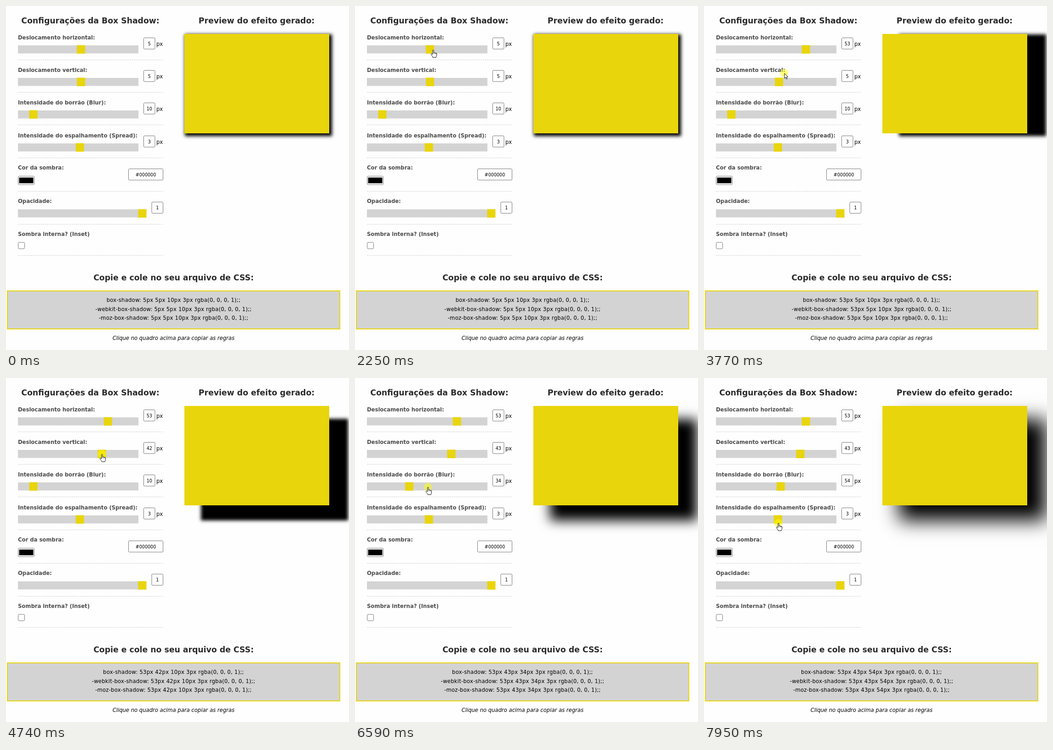
An HTML page that plays this animation: 746x751 px, repeating every 8 s.

```html
<!DOCTYPE html>
<html lang="pt">
<head>
<meta charset="utf-8">
<style>
  html, body { margin: 0; width: 746px; height: 751px; overflow: hidden; background: #fefefe; }
  body { position: relative; }
  svg { position: absolute; left: 0; top: 0; font: 11.6px "DejaVu Sans", sans-serif; }
  #preview { position: absolute; left: 388px; top: 61px; width: 315px; height: 217px; background: #e9d50b; }
  .title { font-size: 17.3px; font-weight: bold; fill: #2b2b2b; }
  .label { font-weight: bold; fill: #4b4b4b; }
  .small { font-size: 9.6px; }
  .mid { text-anchor: middle; }
  .code { letter-spacing: .24px; }
  .field { fill: #fff; stroke: #767676; }
  .track { fill: #d3d3d3; }
  .thumb { fill: #e9d50b; }
  .rule { stroke: #d0d0d0; stroke-dasharray: 3 1.5; }
  .output { fill: #d3d3d3; stroke: #e9d50b; stroke-width: 2; }
  .cursor { fill: #fff; stroke: #111; stroke-linejoin: round; }
</style>
</head>
<body>
<svg width="746" height="751"><g id="page"></g>
  <g id="pointer">
    <circle id="halo" r="9" fill="#ff0" fill-opacity=".5"/>
    <path id="arrow" class="cursor" d="M.5 .5V11.5L3 9.2 4.6 13 6.4 12.3 4.8 8.5H8.2Z"/>
    <g id="hand" class="cursor" transform="translate(.5 .3)">
      <path d="M-1.2 1Q0 -.6 1.2 1V6Q2.6 4.9 3.6 6.5 5 5.6 5.8 7.2 7.6 6.6 7.7 8.5V12Q7.5 14 6.3 15V16.5H-.8V15.2Q-2.2 13.6 -4.3 10.4C-5.2 8.9 -3.6 7.8 -2.5 8.8L-1.2 10.2Z"/>
      <path d="M1.2 6V8.5M3.6 6.5V9M5.8 7.2V9.3" stroke-width=".8"/>
    </g>
  </g>
</svg>
<div id="preview"></div>
<script>
const LOOP = 8000, REFRESH = 70, SCALE = 0.725;
const $ = id => document.getElementById(id);
const easeOut = u => 1 - (1 - u) ** 2;
const mix = (a, b, u) => a + (b - a) * u;
const clamp = u => Math.max(0, Math.min(1, u));

const text = (x, y, str, cls = "", id = "") => `<text id="${id}" x="${x}" y="${y}" class="${cls}">${str}</text>`;
const rect = (x, y, w, h, cls = "", id = "", r = 0) =>
  `<rect id="${id}" x="${x}" y="${y}" width="${w}" height="${h}" rx="${r}" class="${cls}"/>`;
const field = (x, y, w, str, id) =>
  rect(x, y, w, 24.5, "field", "", 2) + text(x + w / 2, y + 16.3, str, "small mid", id);
const rule = y => `<path class="rule" d="M26 ${y}H342"/>`;

// Dragged sliders run from one value to another between start and end
const sliders = [
  { name: "Deslocamento horizontal:", from: 5, to: 53, start: 2460, end: 3360 },
  { name: "Deslocamento vertical:", from: 5, to: 43, start: 4530, end: 4790 },
  { name: "Intensidade do borrão (Blur):", from: 10, to: 54, start: 6310, end: 7130, min: 0 },
  { name: "Intensidade do espalhamento (Spread):", from: 3, to: 3, start: 0, end: 1 }
];
const rowY = i => Math.round(i * 71.2);
const valueAt = (s, t) => Math.round(mix(s.from, s.to, easeOut(clamp((t - s.start) / (s.end - s.start)))));
const thumbX = ({ min = -100 }, v) => 26 + 244 * (v - min) / (100 - min);
const prefixes = ["", "-webkit-", "-moz-"];

$("page").innerHTML =
  text(183.5, 38, "Configurações da Box Shadow:", "title mid") +
  text(545, 38, "Preview do efeito gerado:", "title mid") +
  text(364.5, 598.5, "Copie e cole no seu arquivo de CSS:", "title mid") +
  sliders.map(({ name }, i) => {
    const y = rowY(i);
    return text(26, 72.5 + y, name, "label") +
      rect(26, 86 + y, 262, 17.5, "track") +
      rect(0, 85.5 + y, 18, 18.5, "thumb", "thumb" + i) +
      field(299.5, 69.5 + y, 24.5, "", "value" + i) +
      text(327, 87 + y, "px") + rule(117.5 + y);
  }).join("") +
  text(26, 357, "Cor da sombra:", "label") +
  rect(26.5, 371.5, 35, 18.5, "field", "", 2) + rect(28.5, 374.5, 31, 12.5) +
  field(266.5, 355.5, 75, "#000000") + rule(404.5) +
  text(26, 430.3, "Opacidade:", "label") +
  rect(26, 444, 279, 17.5, "track") + rect(287.5, 443.5, 18, 18.5, "thumb") +
  field(317, 428, 24.5, "1") + rule(476.5) +
  text(26, 501.8, "Sombra interna? (Inset)", "label") +
  rect(26.5, 516, 14, 14, "field", "", 2.5) + rule(544.5) +
  rect(3, 622, 723, 83, "output") +
  prefixes.map((p, i) => text(364.3, 646 + i * 19.5, "", "mid code", "code" + i)).join("") +
  `<g font-style="italic">${text(364.3, 729, "Clique no quadro acima para copiar as regras", "mid")}</g>`;

// Pointer moves: start, end, and where it arrives
const origin = [658, 664];
const moves = [
  [570, 1370, 172, 186], [1440, 1700, 164, 124], [1900, 2250, 169.5, 95.5],
  [2450, 2786, 233.5, 95.5], [2853, 3190, 222, 97], [3340, 3340, 222, 97],
  [3540, 3706, 174.5, 146.5], [3789, 4120, 168, 166], [4400, 4530, 207.5, 166],
  [4740, 4870, 209, 166], [5410, 5550, 76, 230], [5900, 6120, 61, 237],
  [6310, 6710, 167, 238], [7130, 7330, 167, 337], [7590, 7950, 161.5, 316.5]
];

// The screen only refreshes while the pointer moves, in equal steps
function screenAt(time) {
  let shown = 0, [x, y] = origin;
  for (const [start, end, toX, toY] of moves) {
    if (time < start) break;
    const steps = Math.round((end - start) / REFRESH);
    const step = (end - start) / (steps || 1);
    const i = Math.min(steps, Math.floor((time - start) / (step || 1) + 1e-6));
    const u = easeOut((i + 1) / (steps + 1));
    shown = start + i * step;
    x = mix(x, toX, u);
    y = mix(y, toY, u);
  }
  return { t: shown, x, y };
}

function draw(time) {
  const { t, x, y } = screenAt(time);
  const values = sliders.map(s => valueAt(s, t));
  values.forEach((v, i) => {
    $("thumb" + i).setAttribute("x", thumbX(sliders[i], v));
    $("value" + i).textContent = v;
  });
  const css = values.map(v => v + "px").join(" ") + " rgba(0, 0, 0, 1)";
  prefixes.forEach((p, i) => $("code" + i).textContent = `${p}box-shadow: ${css};;`);
  $("preview").style.boxShadow = values.map(v => v * SCALE + "px").join(" ") + " #000";

  const overSlider = x > 26 && x < 288 && sliders.some((s, i) => Math.abs(y - rowY(i) - 94.7) < 9.7);
  const show = (id, on) => $(id).style.display = on ? "" : "none";
  $("pointer").setAttribute("transform", `translate(${x} ${y})`);
  show("pointer", t >= moves[0][0]);
  show("halo", t >= 2450);
  show("hand", overSlider);
  show("arrow", !overSlider);
}

function frame() {
  draw(performance.now() % LOOP);
  requestAnimationFrame(frame);
}
frame();
</script>
</body>
</html>
```
